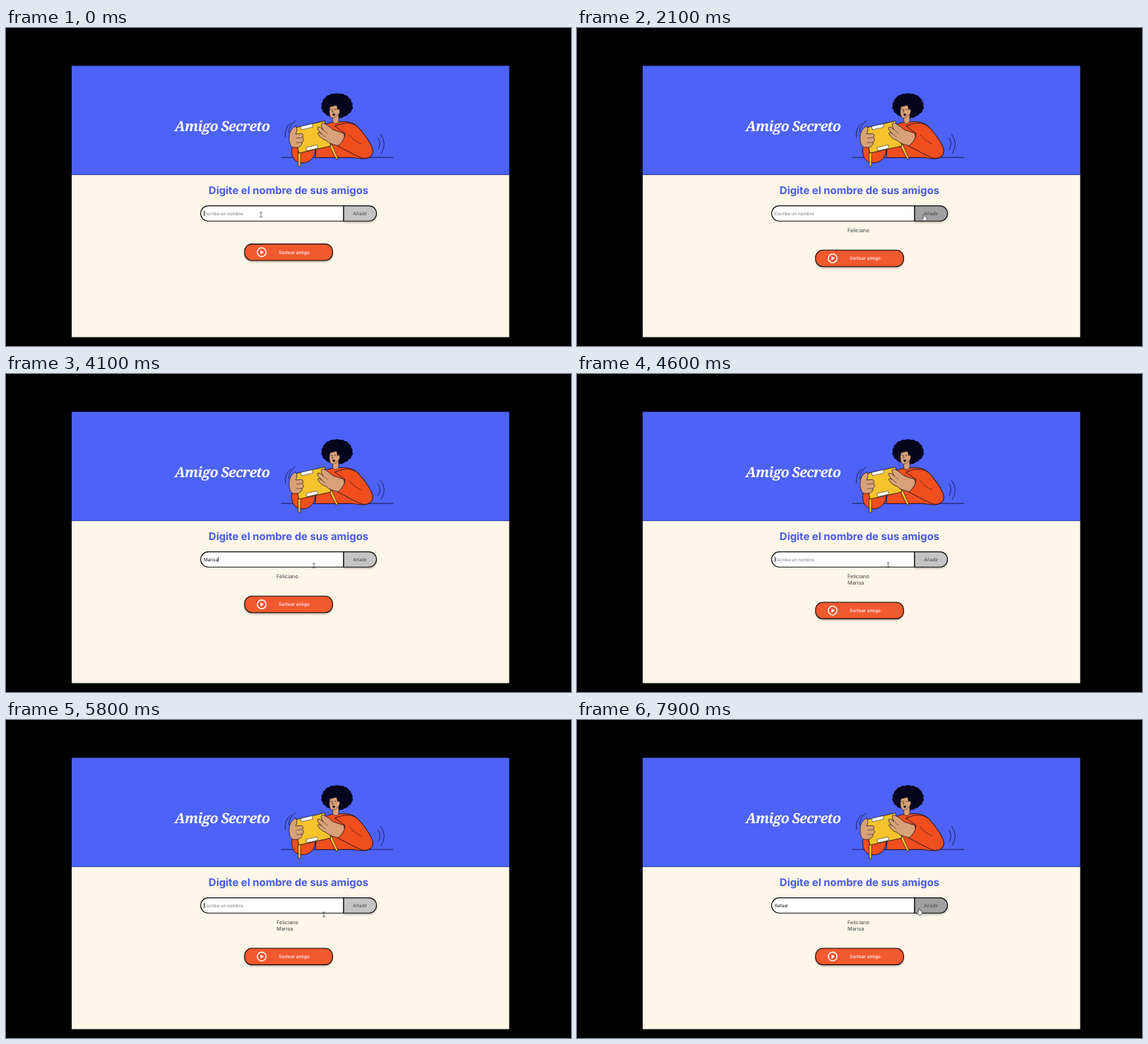
These frames come from a looping animation (800x450 px, 8 s). An HTML page with a canvas:

```html
<!DOCTYPE html>
<html lang="es">
<head>
<meta charset="utf-8">
<title>Amigo Secreto</title>
<style>
  html, body { margin: 0; width: 100%; height: 100%; overflow: hidden; background: #000; }
  canvas { display: block; width: 800px; height: 450px; }
</style>
</head>
<body>
<canvas id="stage"></canvas>
<script>
const LOOP = 8000, STEP = 100, BLINK = 530;
const INK = '#090a1c', SKIN = '#d9a177', RED = '#f04e1f', GOLD = '#f5c32c';
const canvas = document.getElementById('stage');
const ctx = canvas.getContext('2d');
const ratio = window.devicePixelRatio || 1;
canvas.width = 800 * ratio;
canvas.height = 450 * ratio;

// Typing span, moment the name joins the list, and when the field has focus.
const entries = [
  { name: 'Feliciano', from: 300, to: 1100, add: 1900, focus: 0, blur: 1900 },
  { name: 'Marisa', from: 3300, to: 3900, add: 4600, focus: 3100, blur: 4600 },
  { name: 'Rafael', from: 6700, to: 7300, add: LOOP, focus: 4600, blur: LOOP }
];

const mouse = [
  [0, 361, 264], [1300, 361, 264], [1800, 492, 268], [2500, 492, 268],
  [3000, 436, 271], [4300, 436, 271], [4900, 445, 269], [5200, 445, 269],
  [5700, 450, 275], [7300, 450, 275], [7800, 485, 271], [LOOP, 485, 271]
];

function mouseAt(t) {
  const i = Math.max(1, mouse.findIndex(k => k[0] > t));
  const [t0, x0, y0] = mouse[i - 1], [t1, x1, y1] = mouse[i];
  const p = (t - t0) / (t1 - t0), e = p * p * (3 - 2 * p);
  return { x: x0 + (x1 - x0) * e, y: y0 + (y1 - y0) * e };
}

function text(str, x, y, size, color, weight = 400, align = 'left', family = 'Inter, sans-serif') {
  ctx.font = `${weight} ${size}px ${family}`;
  ctx.textAlign = align;
  ctx.fillStyle = color;
  ctx.fillText(str, x, y);
}

function shape(d, fill, stroke = INK, width = 0.8) {
  const path = new Path2D(d);
  if (fill) { ctx.fillStyle = fill; ctx.fill(path); }
  if (stroke) { ctx.strokeStyle = stroke; ctx.lineWidth = width; ctx.stroke(path); }
}

function box(x, y, w, h, radii, fill, shadow) {
  ctx.save();
  ctx.beginPath();
  ctx.roundRect(x, y, w, h, radii);
  if (shadow) {
    ctx.shadowColor = 'rgba(0,0,0,.3)';
    ctx.shadowBlur = 3 * ratio;
    ctx.shadowOffsetY = 2 * ratio;
  }
  ctx.fillStyle = fill;
  ctx.fill();
  ctx.shadowColor = 'transparent';
  ctx.strokeStyle = '#0c0805';
  ctx.lineWidth = 1.1;
  ctx.stroke();
  ctx.restore();
}

function drawHair() {
  ctx.beginPath();
  for (let i = 0; i <= 240; i++) {
    const a = i / 240 * Math.PI * 2;
    const k = 1 + 0.045 * Math.abs(Math.sin(a * 9)) + 0.012 * Math.sin(a * 5);
    ctx.lineTo(468.7 + Math.cos(a) * 21.5 * k, 110 + Math.sin(a) * 17.2 * k);
  }
  ctx.fillStyle = '#05061d';
  ctx.fill();
}

function drawPerson() {
  shape('M390 183.2H548', null, INK, 0.8);
  // body and far sleeve
  shape('M405 169C403 181 408 189 416 190.5C427 192 434 187 437 178L439 165L420 160Z', RED);
  shape('M438 183.2L440 160L452 137C457 134 463 133 471 133C486 131 495 135 501 143C508 151 516 162 519 172C520 180 515 185 506 185C499 185 492 183.2 487 183.2Z', RED);
  // neck and head
  drawHair();
  shape('M462 123L463 133C464 136 469 136 471 133L471 119Z', SKIN, INK, 0.6);
  shape('M459 111C457.5 116 457.5 121 459 125C461 129 466 128 469.5 123C472 122 473.5 118 472 115.5C471 114 470 114 469.6 116L468.5 110C466 108.5 462 112 459 111Z', SKIN, INK, 0.5);
  shape('M460 115.5L462 115M465 115L467.5 115.5M462.5 116L461.8 119L463.2 119.2', null, INK, 0.6);
  shape('M462.2 121.5Q464.4 120.8 466 121.6Q466 124.6 464 124.6Q462.4 124 462.2 121.5Z', '#160b13', null);
  // box
  shape('M413.8 176L417.2 175.5L416.8 196H414.2Z', GOLD, INK, 0.6);
  shape('M458 166L461 164L470 184.5L467.8 185.6Z', GOLD, INK, 0.6);
  shape('M408 141.5L451 131.5L460 167L415 177Z', GOLD);
  shape('M417.5 139.3L433.5 135.6L434.6 140.2L418.6 143.9Z', '#fff', INK, 0.5);
  shape('M425 169L440.5 165.4L441.7 170L426.2 173.6Z', '#fff', INK, 0.5);
  // hands
  shape('M410 139C405 141 401 147 401 154C400.5 161 402 166 406 169L413 169C417 168 419.5 165 419 162C422 160 422 156.5 419.5 155C422 152 420.5 149 416 149.5L410 150C412.5 146 412.5 141 410 139Z', SKIN, INK, 0.7);
  shape('M419 155L411 156M419 162L411 162', null, INK, 0.5);
  shape('M480 159C477 164 473 166.5 470 166.5C463 165 457 163 453 159C447 157 443 153 441.5 149C442 147 444.5 148 447 150C443 146 440 143 441.5 140.5C443.5 139.5 446.5 141.5 449 144C446 139 445 135.5 448 134.5C453 135 458 140 463 144L478 149Z', SKIN, INK, 0.7);
  shape('M447 150L452 154M449 144L455 149', null, INK, 0.5);
  shape('M474 136C483 133 493 134 500 142C508 151 516 162 519 171C521 180 514 186 504 184C493 180 480 172 470 167C477 161 480 155 480 149L466 139Z', RED);
  shape('M486 151C491 158 497 161 503 164', null, INK, 0.5);
  // shaking marks
  shape('M403 134.5Q394 142 395.5 154.5M409.5 131.5Q400 138 400.5 148M526.8 155.5Q532 163 527 172M530.5 150.5Q540 163 531.5 177.5', null, INK, 0.7);
}

function drawPage() {
  ctx.fillStyle = '#000';
  ctx.fillRect(0, 0, 800, 450);
  ctx.fillStyle = '#4d62f7';
  ctx.fillRect(93, 53.5, 619.5, 154.5);
  ctx.fillStyle = '#fdf6e9';
  ctx.fillRect(93, 208, 619.5, 229);
  ctx.fillStyle = '#8c9a90';
  ctx.fillRect(93, 437, 619.5, 0.8);
  ctx.fillStyle = '#2c3890';
  ctx.fillRect(93, 207.3, 619.5, 0.8);
  ctx.letterSpacing = '-0.8px';
  text('Amigo Secreto', 306, 145.8, 19.9, '#fff', 'italic 700', 'center', 'Merriweather, "Noto Serif", serif');
  ctx.letterSpacing = '0px';
  drawPerson();
  text('Digite el nombre de sus amigos', 400, 235, 14.9, '#475be6', 700, 'center');
}

function drawField(t, hover) {
  box(478, 251.6, 46.6, 21.6, [0, 11, 11, 0], hover ? '#a0a0a0' : '#c4c4c4', true);
  box(275.6, 251.6, 202.2, 21.6, [11, 0, 0, 11], '#fff');
  text('Añadir', 501.3, 264.7, 6.5, '#444', 400, 'center');

  const entry = entries.find(e => t < e.add);
  const p = Math.min(1, Math.max(0, (t - entry.from) / (entry.to - entry.from)));
  const typed = entry.name.slice(0, Math.floor(p * entry.name.length));
  if (typed) text(typed, 280, 264.6, 6.35, '#111');
  else text('Escribe un nombre', 280, 264.6, 6.25, '#757575');

  const focused = t >= entry.focus && t < entry.blur;
  const typing = t >= entry.from && t <= entry.to;
  const since = t > entry.to ? t - entry.to : t - entry.focus;
  if (focused && (typing || Math.floor(since / BLINK) % 2 === 0)) {
    ctx.font = '400 6.35px Inter, sans-serif';
    ctx.fillStyle = '#111';
    ctx.fillRect(280.1 + ctx.measureText(typed).width, 258.7, 0.8, 7.2);
  }
}

function drawList(t) {
  const names = entries.filter(e => t >= e.add).map(e => e.name);
  names.forEach((n, i) => text(n, 383, 289.2 + i * 8.7, 7.4, '#444'));
  const y = 305.6 + names.length * 8.7;
  box(337.8, y, 124.6, 23.4, 10.5, '#f1592e', true);
  const cy = y + 11.7;
  ctx.beginPath();
  ctx.arc(362, cy, 6.2, 0, Math.PI * 2);
  ctx.strokeStyle = '#fff';
  ctx.lineWidth = 1.5;
  ctx.stroke();
  shape(`M360.3 ${cy - 3}L365 ${cy}L360.3 ${cy + 3}Z`, '#fff', null);
  text('Sortear amigo', 408, cy + 2.4, 6.5, '#fff', 500, 'center');
}

function drawMouse({ x, y }, hover) {
  ctx.save();
  ctx.translate(x, y);
  if (hover) {
    shape('M-1.6 -4.2Q-0.8 -5 -0.1 -4.2V-1.2Q0.7 -1.8 1.2 -0.9Q2 -1.3 2.4 -0.4Q3.4 -0.7 3.5 0.4V2.2L2.4 4.8H-1.2L-3.6 1.4Q-3.6 0.1 -2.6 0.5L-1.6 1.4Z', '#fff', '#222', 0.6);
  } else {
    shape('M-1.5 -3.3Q0 -3.4 0 -2.6Q0 -3.4 1.5 -3.3M0 -2.6V2.9M-1.5 3.5Q0 3.6 0 2.8Q0 3.6 1.5 3.5', null, '#222', 0.65);
  }
  ctx.restore();
}

function draw(now) {
  const t = Math.floor((now % LOOP) / STEP) * STEP;
  const pos = mouseAt(t);
  const hover = pos.x > 478;
  ctx.setTransform(ratio, 0, 0, ratio, 0, 0);
  ctx.lineJoin = ctx.lineCap = 'round';
  ctx.textRendering = 'geometricPrecision';
  drawPage();
  drawField(t, hover);
  drawList(t);
  drawMouse(pos, hover);
}

let start;
function tick(now) {
  start ??= now;
  draw(now - start);
  requestAnimationFrame(tick);
}
requestAnimationFrame(tick);
</script>
</body>
</html>
```
